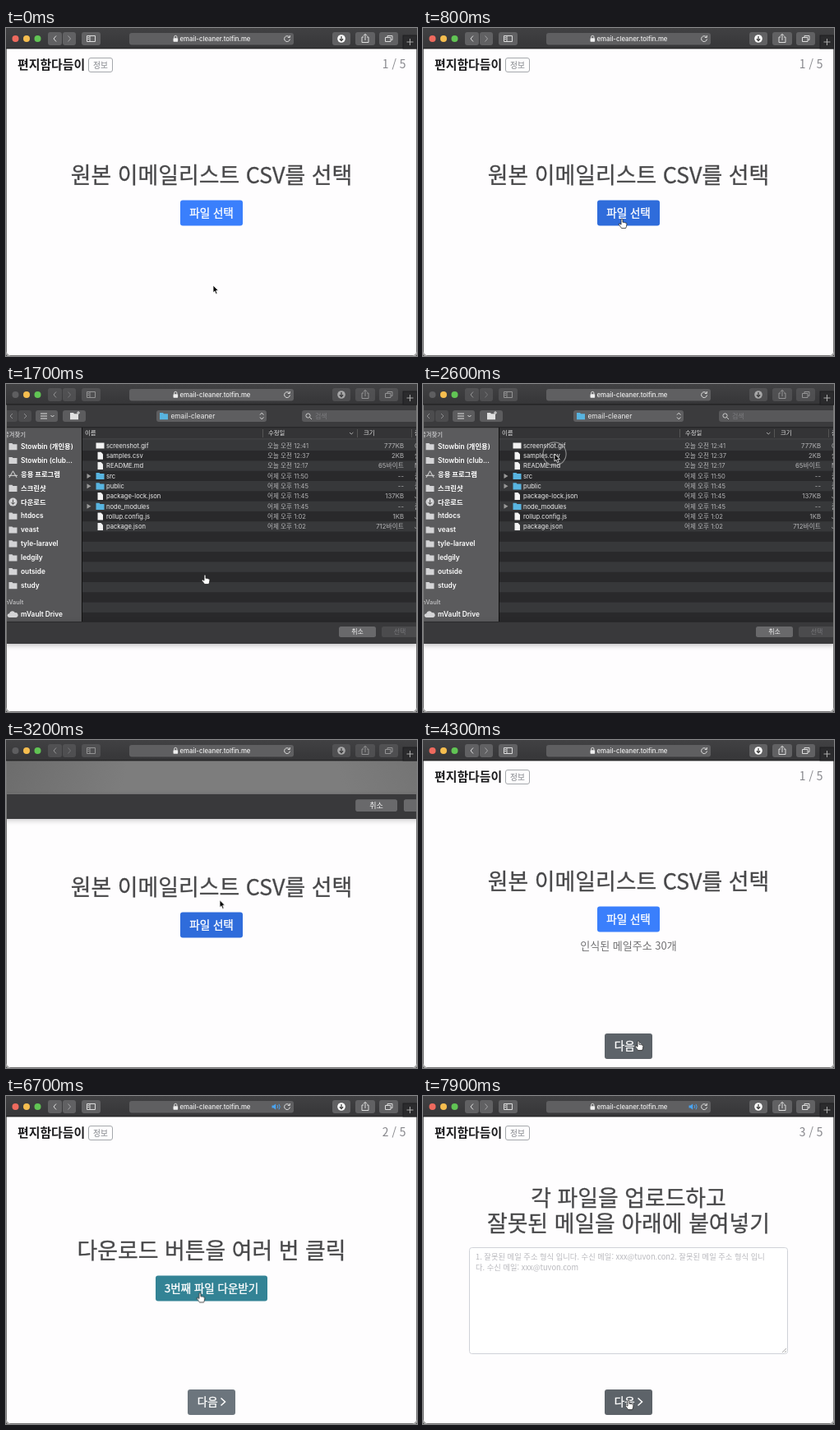
These frames come from a looping animation (500x399 px, 8 s). An HTML page:

```html
<!DOCTYPE html>
<html lang="ko">
<head>
<meta charset="utf-8">
<title>메일 정리</title>
<style>
html, body { margin: 0; width: 100%; height: 100%; overflow: hidden; background: #555; }
.stage { position: relative; width: 500px; height: 399px; overflow: hidden; }
.stage > *, .sheet, .foot { position: absolute; left: 0; top: 0; display: block; }
.clip { top: 25px; width: 500px; height: 374px; overflow: hidden; border-radius: 0 0 4px 4px; }
text { font-family: "Noto Sans CJK KR", "Noto Sans CJK SC", "Noto Sans CJK JP", sans-serif; white-space: pre; }
.ui text { font-family: Inter, "Noto Sans CJK KR", "Noto Sans CJK JP", sans-serif; }
.mid { text-anchor: middle; }
.h { font-size: 26.9px; fill: #48484a; stroke: #48484a; stroke-width: .3; text-anchor: middle; }
.b { font-size: 13.5px; fill: #fff; stroke: #fff; stroke-width: .35; text-anchor: middle; }
.n { font-size: 13.9px; fill: #85858a; text-anchor: end; }
.ph { font-size: 9.3px; fill: #b9b9be; }
.line { fill: none; stroke: #ddd; stroke-width: 1; }

/* all timelines share one 8 s clock */
.cut { animation: 8s step-end infinite; }
.fade { animation: 8s linear infinite; }
.p1 { animation-name: p1; }
.p2 { animation-name: p2; }
.p3 { animation-name: p3; }
.next { animation-name: next; }
.shift { animation-name: shift; }
.count { animation-name: count; }
.pick { animation-name: pick; }
.get { animation-name: get; }
.nextHover { animation-name: nextHover; }
.l1 { animation-name: l1; }
.l2 { animation-name: l2; }
.l3 { animation-name: l3; }
.dim { animation-name: dim; }
.close { animation-name: close; }
.sound { animation-name: sound; }
.chosen { animation-name: chosen; }
.blank { animation-name: blank; }
.side { animation-name: side; }
.hand { animation-name: hand; }
.arrow { animation-name: arrow; }

@keyframes p1 { 0%, 57.5% { opacity: 1 } 58.75%, 100% { opacity: 0 } }
@keyframes p2 { 0%, 58.75% { opacity: 0 } 61%, 92.7% { opacity: 1 } 94%, 100% { opacity: 0 } }
@keyframes p3 { 0%, 94% { opacity: 0 } 96.2%, 100% { opacity: 1 } }
@keyframes next {
  0%, 43.6% { opacity: 0 } 43.7%, 57.5% { opacity: 1 } 58.75%, 76.4% { opacity: 0 }
  76.5%, 92.7% { opacity: 1 } 94% { opacity: 0 } 96.2%, 100% { opacity: 1 }
}
@keyframes shift { 0% { transform: none } 43.6%, 100% { transform: translateY(-7px) } }
@keyframes count { 0% { opacity: 0 } 43.6%, 100% { opacity: 1 } }
@keyframes pick { 0% { fill: #3a7ffc } 9% { fill: #2f6cdb } 41.2%, 100% { fill: #3a7ffc } }
@keyframes get { 0% { fill: #2b9fb3 } 68% { fill: #338395 } 84%, 100% { fill: #2b9fb3 } }
@keyframes nextHover { 0% { fill: #6c757d } 45% { fill: #5d6369 } 59% { fill: #6c757d } 90.6%, 100% { fill: #5d6369 } }
@keyframes l1 { 0% { opacity: 1 } 75%, 100% { opacity: 0 } }
@keyframes l2 { 0% { opacity: 0 } 75% { opacity: 1 } 81.2%, 100% { opacity: 0 } }
@keyframes l3 { 0% { opacity: 0 } 81.2%, 100% { opacity: 1 } }
@keyframes dim { 0% { opacity: 1 } 15.5% { opacity: .55 } 41.2%, 100% { opacity: 1 } }
@keyframes close { 0% { fill: #ee6a5e } 15.5% { fill: #5e5e60 } 41.2%, 100% { fill: #ee6a5e } }
@keyframes sound { 0% { opacity: 0 } 76.2%, 100% { opacity: 1 } }
@keyframes chosen { 0% { opacity: 0 } 33.4% { opacity: 1 } 42%, 100% { opacity: 0 } }
@keyframes blank { 0% { opacity: 0 } 37.4% { opacity: 1 } 42%, 100% { opacity: 0 } }
@keyframes side { 0%, 18% { fill: #3e3e40 } 22%, 100% { fill: #5b5b5d } }
@keyframes hand {
  0% { opacity: 0 } 8.9% { opacity: 1 } 22.4% { opacity: 0 } 45% { opacity: 1 } 58.7% { opacity: 0 }
  68% { opacity: 1 } 84% { opacity: 0 } 90.6%, 100% { opacity: 1 }
}
@keyframes arrow {
  0% { opacity: 1 } 8.9% { opacity: 0 } 22.4% { opacity: 1 } 45% { opacity: 0 } 58.7% { opacity: 1 }
  68% { opacity: 0 } 84% { opacity: 1 } 90.6%, 100% { opacity: 0 }
}

/* the file sheet swings out of a slot under the toolbar, its button bar stays upright */
.sheet, .foot { transform-origin: 250px 0; animation: sheet 8s linear infinite; }
.foot { top: 264px; box-shadow: 0 2px 6px rgba(0,0,0,.25); animation-name: foot; }
@keyframes sheet {
  0%, 15.4% { transform: perspective(305px) rotateX(32deg) translateY(-320px) }
  17.5% { transform: perspective(305px) rotateX(32deg) translateY(-209px) }
  19.4% { transform: perspective(305px) rotateX(12deg) translateY(-80px) }
  21.25%, 37.2% { transform: perspective(305px) rotateX(0deg) translateY(0px) }
  38.75% { transform: perspective(305px) rotateX(14deg) translateY(-110px) }
  40% { transform: perspective(305px) rotateX(32deg) translateY(-219px) }
  41.2%, 100% { transform: perspective(305px) rotateX(32deg) translateY(-320px) }
}
@keyframes foot {
  0%, 15.4% { transform: translateY(-320px) scale(1.13) }
  17.5% { transform: translateY(-212.5px) scale(1.13) }
  19.4% { transform: translateY(-58px) scale(1.14) }
  21.25%, 37.2% { transform: translateY(0px) scale(1) }
  38.75% { transform: translateY(-94px) scale(1.14) }
  40% { transform: translateY(-222.5px) scale(1.13) }
  41.2%, 100% { transform: translateY(-320px) scale(1.13) }
}

.cursor { animation: move 8s ease-in-out infinite; }
@keyframes move {
  0%, 1.25% { transform: translate(252px, 313px) }
  10%, 23% { transform: translate(242px, 232px) }
  31% { transform: translate(160px, 85px) }
  36.2% { transform: translate(160px, 85px); animation-timing-function: ease-in }
  40% { transform: translate(260px, 194px); animation-timing-function: ease-out }
  45.6%, 58% { transform: translate(262px, 366px) }
  69%, 82.5% { transform: translate(235px, 232px) }
  90% { transform: translate(250px, 361px) }
  91.25%, 100% { transform: translate(250px, 370px) }
}
.ring { fill: none; stroke: #aaa; opacity: 0; animation: ring 8s linear infinite; animation-delay: calc((var(--at) - 8000) * 1ms); }
@keyframes ring {
  0% { transform: scale(.4); opacity: .9 }
  1.25% { transform: scale(1); opacity: .9 }
  2.5% { transform: scale(1.5); opacity: .2 }
  2.6%, 100% { transform: scale(1.5); opacity: 0 }
}
</style>
</head>
<body>
<div class="stage">

<!-- web page -->
<svg width="500" height="399">
  <rect width="500" height="399" rx="4" fill="#fefdfe"/>
  <text x="14" y="49.6" font-size="14.9" font-weight="700" fill="#1c1c1e">편지함다듬이</text>
  <rect x="100.5" y="36.5" width="29" height="17" rx="2.5" fill="none" stroke="#a5a8ac"/>
  <text class="mid" x="115" y="48.8" font-size="9.7" fill="#808489">정보</text>

  <g class="fade p1">
    <text class="n" x="486.5" y="49.2">1 / 5</text>
    <g class="cut shift">
      <text class="h" x="250" y="189.2">원본 이메일리스트 CSV를 선택</text>
      <rect class="cut pick" x="212" y="209.5" width="76" height="31" rx="3"/>
      <text class="b" x="250" y="229.6">파일 선택</text>
    </g>
    <text class="mid cut count" x="250" y="255" font-size="13" fill="#707072">인식된 메일주소 30개</text>
  </g>

  <g class="fade p2">
    <text class="n" x="486.5" y="49.2">2 / 5</text>
    <text class="h" x="250" y="198">다운로드 버튼을 여러 번 클릭</text>
    <rect class="cut get" x="182" y="218.5" width="136" height="31" rx="3"/>
    <text class="b cut l1" x="250" y="238.5">1번째 파일 다운받기</text>
    <text class="b cut l2" x="250" y="238.5">2번째 파일 다운받기</text>
    <text class="b cut l3" x="250" y="238.5">3번째 파일 다운받기</text>
  </g>

  <g class="fade p3">
    <text class="n" x="486.5" y="49.2">3 / 5</text>
    <text class="h" x="250" y="134">각 파일을 업로드하고</text>
    <text class="h" x="250" y="164.6">잘못된 메일을 아래에 붙여넣기</text>
    <rect x="56.5" y="184.5" width="387" height="129" rx="3" fill="#fff" stroke="#d0d2d8"/>
    <text class="ph" x="64" y="198.6">1. 잘못된 메일 주소 형식 입니다. 수신 메일: xxx@tuvon.con2. 잘못된 메일 주소 형식 입니</text>
    <text class="ph" x="64" y="211.8">다. 수신 메일: xxx@tuvon.com</text>
    <path d="M437 312l5-5M440 312l2-2" stroke="#888" stroke-width=".7"/>
  </g>

  <g class="fade next">
    <rect class="cut nextHover" x="221" y="357" width="58" height="31" rx="3"/>
    <text class="b" x="245.2" y="376.6">다음</text>
    <path d="M261.5 367.5l5 4.5-5 4.5" fill="none" stroke="#fff" stroke-width="1.5"/>
  </g>
</svg>

<!-- file sheet -->
<div class="clip">
  <svg class="sheet ui" id="sheet" width="500" height="264" viewBox="0 25 500 264"></svg>
  <svg class="foot ui" id="foot" width="500" height="27" viewBox="0 289 500 27"></svg>
</div>

<!-- browser toolbar -->
<svg class="ui" width="500" height="399">
  <defs><linearGradient id="bar" x2="0" y2="1"><stop stop-color="#414143"/><stop offset="1" stop-color="#363638"/></linearGradient></defs>
  <path d="M.5 25V394.5a4 4 0 0 0 4 4H495.5a4 4 0 0 0 4-4V25" fill="none" stroke="#777"/>
  <rect width="500" height="25" fill="url(#bar)"/>
  <rect y="24.4" width="500" height="1" fill="#1b1b1c"/>
  <circle class="cut close" cx="11.5" cy="13" r="4"/>
  <circle cx="25" cy="13" r="4" fill="#f5bd4f"/>
  <circle cx="38.5" cy="13" r="4" fill="#61c454"/>
  <g class="cut dim">
    <g fill="#616163">
      <rect x="51" y="5" width="17" height="16" rx="3"/><rect x="69" y="5" width="16" height="16" rx="3"/>
      <rect x="92" y="5" width="23" height="16" rx="3"/><rect x="397" y="5" width="22" height="16" rx="3"/>
      <rect x="425" y="5" width="24" height="16" rx="3"/><rect x="454" y="5" width="23" height="16" rx="3"/>
    </g>
    <g class="line">
      <path d="M61 9.5l-3 3.5 3 3.5"/><path d="M75.5 9.5l3 3.5-3 3.5" stroke="#a2a2a4"/>
      <path d="M98.5 9.5h10v7h-10zM102 9.5v7M99.5 11.5h1.5M99.5 13.5h1.5"/>
      <path d="M435 11h-2v6.5h8V11h-2M437 15V7.5M434.8 9.5L437 7.3l2.2 2.2"/>
      <path d="M464 11V9.5h6v5h-1.5M461.5 11.5h6.5v5h-6.5z"/>
    </g>
    <circle cx="408" cy="13" r="4.8" fill="#fff"/>
    <path d="M408 10v5.5M405.8 13.3l2.2 2.2 2.2-2.2" fill="none" stroke="#444" stroke-width="1.3"/>
  </g>
  <rect x="150" y="6" width="200" height="14.5" rx="3" fill="#5f5f61"/>
  <rect x="203.5" y="12.3" width="5.6" height="4.4" rx=".7" fill="#eee"/>
  <path d="M204.7 12.5v-1.6a1.6 1.6 0 0 1 3.2 0v1.6" class="line"/>
  <text x="211.5" y="16" font-size="7.8" font-weight="500" fill="#f0f0f0">email-cleaner.tolfin.me</text>
  <path d="M344.8 11.2a3.4 3.4 0 1 0 .6 2.3M345.3 9v2.5h-2.5" class="line"/>
  <g class="cut sound">
    <path d="M323.5 11.6h2l2.7-2.2v7.4l-2.7-2.2h-2z" fill="#4aa3f0"/>
    <path d="M330 11q1.5 2 0 4M332 9.8q2.4 3.3 0 6.6" fill="none" stroke="#4aa3f0"/>
  </g>
  <rect x="483" y="9" width="17" height="16" fill="#2b2b2d" stroke="#1b1b1c" stroke-width=".8"/>
  <path d="M487.5 17h8M491.5 13v8" stroke="#aaa"/>
</svg>

<!-- pointer -->
<svg width="500" height="399">
  <g class="cursor">
    <circle class="ring" r="14" style="--at:950"/>
    <circle class="ring" r="14" style="--at:2500"/>
    <circle class="ring" r="14" style="--at:2700"/>
    <circle class="ring" r="14" style="--at:4400"/>
    <circle class="ring" r="14" style="--at:5900"/>
    <circle class="ring" r="14" style="--at:6400"/>
    <circle class="ring" r="14" style="--at:7350"/>
    <path class="cut arrow" d="M0 0v9l2-1.8 1.5 3.5 1.6-.7L3.6 6.6h2.8z" fill="#000" stroke="#fff" stroke-width=".8"/>
    <path class="cut hand" d="M-1 1a1 1 0 0 1 2 0v3.4q1-.7 1.7.3 1-.5 1.6.4 1.6-.3 1.6 1.3 0 3-1.3 5.2h-5q-1.2-2-3.3-4.2-.5-1.6.9-1.5l1.8 1.3z" fill="#fff" stroke="#222" stroke-width=".8"/>
  </g>
</svg>
</div>

<script>
const rect = (x, y, w, h, fill, more = '') =>
  `<rect x="${x}" y="${y}" width="${w}" height="${h}" fill="${fill}" ${more}/>`;
const text = (x, y, s, size, fill, more = '') =>
  `<text x="${x}" y="${y + size * .36}" font-size="${size}" fill="${fill}" ${more}>${s}</text>`;
const line = (d, color = '#ddd') => `<path class="line" d="${d}" style="stroke:${color}"/>`;
const folder = (x, y, fill) =>
  `<path d="M${x - 5} ${y - 4}h4l1 1.2h5v7h-10z" fill="${fill}"/>`;
const paper = (x, y) => `<path d="M${x - 3} ${y - 4.5}h4l2.5 2.5v6.5h-6.5z" fill="#f2f2f2"/>`;
const picture = (x, y) => rect(x - 5, y - 3.5, 10, 7, '#f2f2f2');

const places = ['Stowbin (개인용)', 'Stowbin (club...', '응용 프로그램', '스크린샷', '다운로드',
  'htdocs', 'veast', 'tyle-laravel', 'ledgily', 'outside', 'study'];
const files = [
  ['screenshot.gif', '오늘 오전 12:41', '777KB', 'G'],
  ['samples.csv', '오늘 오전 12:37', '2KB', '쉼'],
  ['README.md', '오늘 오전 12:17', '65바이트', 'M'],
  ['src', '어제 오후 11:50', '--', '폴'],
  ['public', '어제 오후 11:45', '--', '폴'],
  ['package-lock.json', '어제 오후 11:45', '137KB', 'J'],
  ['node_modules', '어제 오후 11:45', '--', '폴'],
  ['rollup.config.js', '어제 오후 1:02', '1KB', 'J'],
  ['package.json', '어제 오후 1:02', '712바이트', 'J']];
const pitch = 12.3;

function placeIcon(i, y) {
  if (i === 2) return line(`M4 ${y + 4}L8.5 ${y - 4}l4.5 8M3 ${y + 1.5}h11`);
  if (i === 4) return `<circle cx="8.5" cy="${y}" r="5" fill="#d4d4d6"/>` +
    line(`M8.5 ${y - 3}v5.5M6.2 ${y + .4}l2.3 2.3 2.3-2.3`, '#555');
  return folder(8.5, y, '#d4d4d6');
}

function fileIcon(name, y) {
  if (!name.includes('.')) return folder(114.5, y, '#58b4e0') + `<path d="M98.5 ${y - 3}l5 3-5 3z" fill="#999"/>`;
  return name.endsWith('.gif') ? picture(114.5, y) : paper(114.5, y);
}

function list() {
  let s = rect(93, 67, 407, 222, '#37383a');
  for (let i = 1; i < 18; i += 2) s += rect(93, 68.8 + i * pitch, 407, pitch, '#29292b');
  s += `<g class="cut chosen">${rect(93, 68.8 + pitch, 407, pitch, '#1c5fd0')}</g>`;
  files.forEach(([name, date, size, kind], i) => {
    const y = 75 + i * pitch;
    s += fileIcon(name, y) + text(122, y, name, 7.6, '#ececec') + text(318, y, date, 7.6, '#b4b4b6') +
      text(484, y, size, 7.8, '#b4b4b6', 'text-anchor="end"') + text(497, y, kind, 7.6, '#b4b4b6');
  });
  s += rect(93, 53, 407, 14, '#343436') + rect(93, 66.5, 407, .8, '#4a4a4c');
  [[96, '이름'], [319, '수정일'], [435, '크기'], [497, '종류']].forEach(([x, t]) =>
    s += text(x, 59.5, t, 7.4, '#e0e0e0', 'font-weight="500"'));
  [312, 427, 493].forEach(x => s += rect(x, 55, 1, 10, '#555'));
  return s + line('M418 59l2.2 2 2.2-2', '#aaa');
}

function sidebar() {
  let s = rect(0, 53, 92, 236, '#5b5b5d', 'class="fade side"') + rect(92, 53, 1, 236, '#111');
  s += text(-3, 61, '즐겨찾기', 7.3, '#b8b8ba', 'font-weight="600"');
  places.forEach((p, i) => {
    const y = 76 + i * 16.9;
    s += placeIcon(i, y) + text(18, y, p, 8.3, '#fff', 'font-weight="600"');
  });
  s += text(-3, 265, 'mVault', 7.3, '#b8b8ba', 'font-weight="600"');
  s += '<path d="M4 284a2.4 2.4 0 0 1 0-4.8 3.8 3.8 0 0 1 7-1 3 3 0 0 1 1.5 5.8z" fill="#d4d4d6"/>';
  return s + text(18, 280, 'mVault Drive', 8.3, '#fff', 'font-weight="600"');
}

function topBar() {
  const r = 'rx="3"';
  return rect(0, 25, 500, 28, '#3b3b3d') + rect(0, 52.4, 500, .8, '#1c1c1d') +
    rect(-4, 32, 18, 14, '#4c4c4e', r) + line('M8 36l-3 3 3 3', '#8c8c8e') +
    rect(15, 32, 16, 14, '#4c4c4e', r) + line('M22 36l3 3-3 3', '#8c8c8e') +
    rect(36, 32, 27, 14, '#5c5c5e', r) + line('M42 36h8M42 39h8M42 42h8') + line('M54.5 38l2 2 2-2') +
    rect(69, 32, 28, 14, '#5c5c5e', r) + folder(83, 39, '#e0e0e0') + line('M86 35h4M88 33v4') +
    rect(183, 32, 134, 14, '#5e5e60', r) + folder(192, 39, '#58b4e0') +
    text(200.5, 39, 'email-cleaner', 8.3, '#f0f0f0') +
    line('M309 37.5l2.2-2.3 2.2 2.3M309 40.5l2.2 2.3 2.2-2.3') +
    rect(360, 32, 146, 14, '#58585a', r) +
    '<circle cx="367.5" cy="38.5" r="2.6" fill="none" stroke="#ccc"/>' + line('M369.5 40.5l2.5 2.5', '#ccc') +
    text(376, 39, '검색', 8, '#7c7c7f');
}

function bottomBar() {
  const choose = (face, ink) => rect(457, 295, 47, 13, face, 'rx="2.5"') + text(479, 301.5, '선택', 8, ink, 'class="mid"');
  return rect(0, 289, 500, 27, '#39393b') + rect(0, 288.6, 500, .8, '#141415') +
    rect(405, 295, 45, 13, '#69696b', 'rx="2.5"') + text(427.5, 301.5, '취소', 8, '#f4f4f4', 'class="mid"') +
    choose('#4b4b4d', '#77777a') + `<g class="cut chosen">${choose('#69696b', '#f4f4f4')}</g>`;
}

const blank = '<defs><linearGradient id="gray"><stop stop-color="#6c6c6c"/><stop offset=".3" stop-color="#7d7d7d"/>' +
  '<stop offset=".8" stop-color="#7d7d7d"/><stop offset="1" stop-color="#747474"/></linearGradient></defs>' +
  rect(0, 25, 500, 264, 'url(#gray)', 'class="cut blank"');

document.getElementById('sheet').innerHTML = list() + sidebar() + topBar() + blank;
document.getElementById('foot').innerHTML = bottomBar();
</script>
</body>
</html>
```
